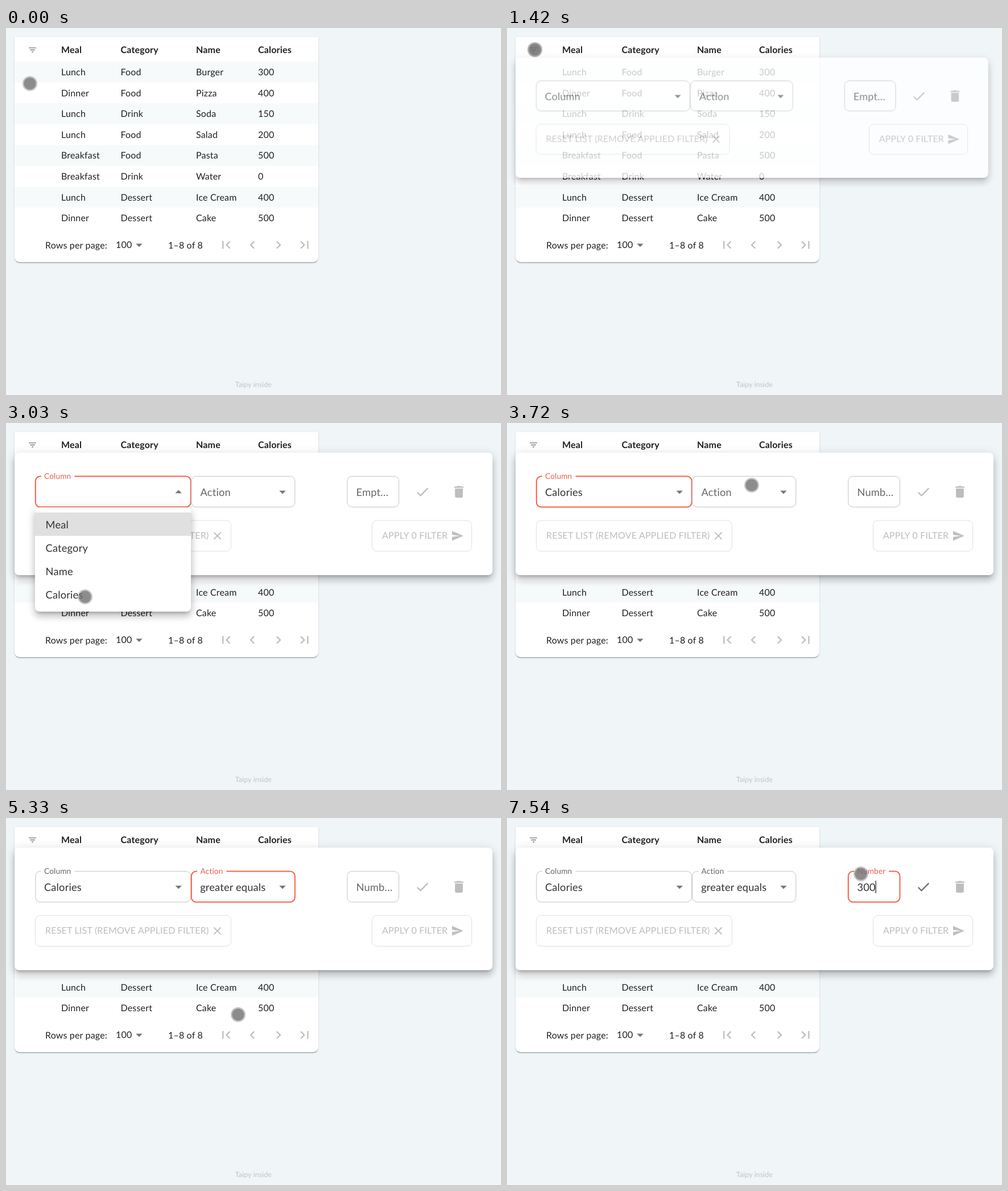
Recreate the animation shown at these times as an HTML page. Size 870x644 px, loop 8000 ms.

```html
<!DOCTYPE html>
<html lang="en">
<head>
<meta charset="utf-8">
<title>Table filter</title>
<style>
  :root { --red: #f9604a; --line: #c4c4c4; --off: #bdbdbd; --ease: cubic-bezier(.4, 0, .2, 1); }
  html, body { margin: 0; width: 100%; height: 100%; overflow: hidden; background: #f0f5f8; }
  .layer, .layer > svg { position: absolute; left: 0; top: 0; width: 870px; height: 644px; overflow: visible; }
  .paper { position: absolute; background: #fff; border-radius: 8px;
    box-shadow: 0 5.7px 5.7px -3.4px #0003, 0 9.1px 11.4px 1.1px #00000024, 0 3.4px 16px 2.3px #0000001f; }
  .table-paper { left: 15px; top: 16px; width: 534px; height: 395px; border-radius: 2px 2px 9px 9px;
    box-shadow: 0 2.3px 1.1px -1.1px #0003, 0 1.1px 1.1px #00000024, 0 1.1px 3.4px #0000001f; }
  .filter-paper { left: 15px; top: 52px; width: 840px; height: 215px; }
  .column-paper { left: 51px; top: 148px; width: 274px; height: 183px; }
  .action-paper { left: 325px; top: 148px; width: 183px; height: 265px; }

  text { font: 16px Lato, sans-serif; letter-spacing: .17px; fill: #212121; stroke: none; text-rendering: geometricPrecision; }
  .head { font-weight: 700; }
  .foot { font-size: 12.7px; letter-spacing: 0; fill: #c0c5c8; }
  .big text { font-size: 18.27px; fill: #333; }
  .button rect { fill: none; stroke: #e0e0e0; }
  .button text { fill: var(--off); letter-spacing: .2px; }
  .icon { fill: #757575; }
  .off { fill: var(--off); }

  .field { stroke: var(--line); stroke-width: 1; color: #666; }
  .field rect { fill: none; }
  .field .notch { fill: #fff; stroke: none; }
  .field .label { fill: currentColor; }
  .field .arrow { fill: #757575; stroke: none; }

  /* One loop is 8000 ms, so 1% is 80 ms. */
  .layer, .grow, .label { animation: 8s var(--ease) infinite; }
  .field, .step, .arrow { animation: 8s step-end infinite; }

  .grow { position: absolute; inset: 0; width: 870px; height: 644px; }
  #filter { animation-name: filter-fade; }
  #filter .grow { animation-name: filter-grow; transform-origin: 15px 52px; }
  #columns { animation-name: columns-fade; }
  #columns .grow { animation-name: columns-grow; transform-origin: 188px 148px; }
  #actions { animation-name: actions-fade; }
  #actions .grow { animation-name: actions-grow; transform-origin: 416.5px 148px; }
  @keyframes filter-fade { 0%, 16.06% { opacity: 0 } 19.53%, 100% { opacity: 1 } }
  @keyframes filter-grow { 0%, 16.06% { transform: scale(.75, .5625) } 18.36%, 100% { transform: scale(1, 1) } }
  @keyframes columns-fade { 0%, 26.59% { opacity: 0 } 29.93%, 38.63% { opacity: 1 } 41.97%, 100% { opacity: 0 } }
  @keyframes columns-grow {
    0%, 26.59% { transform: scale(.75, .5625) } 28.81%, 39.7% { transform: scale(1, 1) }
    41.97%, 100% { transform: scale(.75, .5625) }
  }
  @keyframes actions-fade { 0%, 46.96% { opacity: 0 } 50.6%, 62% { opacity: 1 } 65.65%, 100% { opacity: 0 } }
  @keyframes actions-grow {
    0%, 46.96% { transform: scale(.75, .5625) } 49.4%, 63.2% { transform: scale(1, 1) }
    65.65%, 100% { transform: scale(.75, .5625) }
  }

  #column { animation-name: column-focus; }
  #action { animation-name: action-focus; }
  #number { animation-name: number-focus; }
  @keyframes column-focus { 26.38% { stroke: var(--red); stroke-width: 2; color: #e4614c } 46.63%, 100% { stroke: var(--line); stroke-width: 1; color: #666 } }
  @keyframes action-focus { 46.63% { stroke: var(--red); stroke-width: 2; color: #e4614c } 76.63%, 100% { stroke: var(--line); stroke-width: 1; color: #666 } }
  @keyframes number-focus { 76.63%, 100% { stroke: var(--red); stroke-width: 2; color: #e4614c } }

  .label { animation-timing-function: cubic-bezier(0, 0, .2, 1); transform-origin: 0 0; }
  #column .label { animation-name: column-label; }
  #action .label { animation-name: action-label; }
  #number .label { animation-name: number-label; }
  @keyframes column-label { 0%, 26.88% { transform: none } 29.38%, 100% { transform: translateY(-30px) scale(.75) } }
  @keyframes action-label { 0%, 47.25% { transform: none } 49.75%, 100% { transform: translateY(-30px) scale(.75) } }
  @keyframes number-label { 0%, 76.88% { transform: none } 79.38%, 100% { transform: translateY(-30px) scale(.75) } }

  #column .arrow { animation-name: column-arrow; }
  #action .arrow { animation-name: action-arrow; }
  @keyframes column-arrow { 0% { transform: none } 26.38% { transform: rotate(180deg) } 38.63%, 100% { transform: none } }
  @keyframes action-arrow { 0% { transform: none } 46.63% { transform: rotate(180deg) } 62%, 100% { transform: none } }

  #column .notch { animation-name: at-column; }
  #action .notch { animation-name: at-action; }
  #number .notch, .number-name { animation-name: at-number; }
  .column-value { animation-name: at-picked; }
  .action-value { animation-name: at-chosen; }
  .empty-hint { animation-name: until-picked; }
  .number-hint { animation-name: picked-to-number; }
  .digit1 { animation-name: at-digit1; }
  .digit2 { animation-name: at-digit2; }
  .digit3 { animation-name: at-digit3; }
  @keyframes at-column { 0% { visibility: hidden } 26.9%, 100% { visibility: visible } }
  @keyframes at-picked { 0% { visibility: hidden } 38.63%, 100% { visibility: visible } }
  @keyframes until-picked { 0% { visibility: visible } 38.63%, 100% { visibility: hidden } }
  @keyframes picked-to-number { 0% { visibility: hidden } 38.63% { visibility: visible } 76.63%, 100% { visibility: hidden } }
  @keyframes at-action { 0% { visibility: hidden } 47.3%, 100% { visibility: visible } }
  @keyframes at-chosen { 0% { visibility: hidden } 62%, 100% { visibility: visible } }
  @keyframes at-number { 0% { visibility: hidden } 76.63%, 100% { visibility: visible } }
  @keyframes at-digit1 { 0% { visibility: hidden } 89.25%, 100% { visibility: visible } }
  @keyframes at-digit2 { 0% { visibility: hidden } 91.75%, 100% { visibility: visible } }
  @keyframes at-digit3 { 0% { visibility: hidden } 94.25%, 100% { visibility: visible } }

  .field .caret { fill: #111; stroke: none; animation-name: caret; }
  @keyframes caret {
    0% { opacity: 0; transform: none } 79.4% { opacity: 1; transform: none } 86% { opacity: 0; transform: none }
    89.25% { opacity: 1; transform: translateX(10.5px) } 91.75% { opacity: 1; transform: translateX(21px) }
    94.25%, 100% { opacity: 1; transform: translateX(31.5px) }
  }
  .check { animation-name: check; }
  @keyframes check { 0% { fill: #bdbdbd } 89.25%, 100% { fill: #6e6e6e } }
  .press { animation-name: press; }
  @keyframes press { 0% { opacity: 0 } 16% { opacity: .16 } 20%, 100% { opacity: 0 } }

  #pointer { animation: pointer 8s ease-in-out infinite; }
  @keyframes pointer {
    0%, 4.4% { transform: translate(42px, 97.5px) }
    14.25%, 18% { transform: translate(49px, 38px) }
    25.25%, 28.3% { transform: translate(132px, 113px) }
    35.4%, 39.4% { transform: translate(139px, 305px) }
    45.6%, 55.7% { transform: translate(430px, 109px) }
    55.75% { transform: translate(417px, 244px); animation-timing-function: ease-out }
    57.4%, 69.2% { transform: translate(408px, 345px) }
    72.6%, 75.8% { transform: translate(623px, 114px) }
    75.87%, 76.9% { transform: translate(628px, 111px) }
    81.2%, 100% { transform: translate(622px, 98px) }
  }
</style>
</head>
<body>
<svg width="0" height="0" style="position:absolute">
  <symbol id="filter-icon" viewBox="0 0 24 24"><path d="M10 18h4v-2h-4zM3 6v2h18V6zm3 7h12v-2H6z"/></symbol>
  <symbol id="down" viewBox="0 0 24 24"><path d="M7 10l5 5 5-5z"/></symbol>
  <symbol id="first" viewBox="0 0 24 24"><path d="M18.4 16.6L13.8 12l4.6-4.6L17 6l-6 6 6 6zM6 6h2v12H6z"/></symbol>
  <symbol id="prev" viewBox="0 0 24 24"><path d="M15.4 16.6L10.8 12l4.6-4.6L14 6l-6 6 6 6z"/></symbol>
  <symbol id="next" viewBox="0 0 24 24"><path d="M8.6 16.6L13.2 12 8.6 7.4 10 6l6 6-6 6z"/></symbol>
  <symbol id="last" viewBox="0 0 24 24"><path d="M5.6 7.4L10.2 12l-4.6 4.6L7 18l6-6-6-6zM16 6h2v12h-2z"/></symbol>
  <symbol id="tick" viewBox="0 0 24 24"><path d="M9 16.2L4.8 12l-1.4 1.4L9 19 21 7l-1.4-1.4z"/></symbol>
  <symbol id="bin" viewBox="0 0 24 24"><path d="M6 19c0 1.1.9 2 2 2h8c1.1 0 2-.9 2-2V7H6zM19 4h-3.5l-1-1h-5l-1 1H5v2h14z"/></symbol>
  <symbol id="cross" viewBox="0 0 24 24"><path d="M19 6.4L17.6 5 12 10.6 6.4 5 5 6.4l5.6 5.6L5 17.6 6.4 19l5.6-5.6 5.6 5.6 1.4-1.4-5.6-5.6z"/></symbol>
  <symbol id="send" viewBox="0 0 24 24"><path d="M2 21l21-9L2 3v7l15 2-15 2z"/></symbol>
</svg>

<div class="layer">
  <div class="paper table-paper"></div>
  <svg>
    <g id="rows"></g>
    <use class="icon" href="#filter-icon" x="37.9" y="29.8" width="17.3" height="17.3"/>
    <text x="69" y="387">Rows per page:</text>
    <text x="193" y="386">100</text>
    <text x="285" y="387">1–8 of 8</text>
    <use class="icon" href="#down" x="220.3" y="367" width="27.4" height="27.4"/>
    <g class="off">
      <use href="#first" x="373.3" y="367" width="27.4" height="27.4"/>
      <use href="#prev" x="419.3" y="367" width="27.4" height="27.4"/>
      <use href="#next" x="465.3" y="367" width="27.4" height="27.4"/>
      <use href="#last" x="511" y="367" width="27.4" height="27.4"/>
    </g>
    <text class="foot" x="402.7" y="629.5">Taipy inside</text>
  </svg>
</div>

<div class="layer" id="filter"><div class="grow">
  <div class="paper filter-paper"></div>
  <svg class="layer">
    <g class="big">
      <g class="field" id="column">
        <rect x="51.8" y="93.5" width="273" height="54" rx="8.5"/>
        <rect class="notch step" x="62" y="91" width="58.5" height="5"/>
        <g transform="translate(303.3 121)"><path class="arrow" d="M-5.7-2.3H5.7L0 3.4z"/></g>
        <g transform="translate(67 128)"><text class="label">Column</text></g>
        <text class="step column-value" x="67" y="128">Calories</text>
      </g>
      <g class="field" id="action">
        <rect x="325.8" y="93.5" width="182" height="54" rx="8.5"/>
        <rect class="notch step" x="336" y="91" width="51.5" height="5"/>
        <g transform="translate(486 121)"><path class="arrow" d="M-5.7-2.3H5.7L0 3.4z"/></g>
        <g transform="translate(341.5 128)"><text class="label">Action</text></g>
        <text class="step action-value" x="341.2" y="128">greater equals</text>
      </g>
      <g class="field" id="number">
        <rect x="599.8" y="93.5" width="90.7" height="54" rx="8.5"/>
        <rect class="notch step" x="610" y="91" width="61" height="5"/>
        <text class="step empty-hint" x="615.5" y="128" style="fill:#666">Empt…</text>
        <text class="step number-hint" x="615.5" y="128" style="fill:#666">Numb…</text>
        <g class="step number-name" transform="translate(615.5 128)"><text class="label">Number</text></g>
        <text x="615.5" y="128"><tspan class="step digit1">3</tspan><tspan class="step digit2">0</tspan><tspan class="step digit3">0</tspan></text>
        <rect class="caret step" x="616" y="110" width="1.2" height="22"/>
      </g>
    </g>
    <use class="step check" href="#tick" x="718.2" y="107.2" width="27.4" height="27.4"/>
    <use class="off" href="#bin" x="782.3" y="107" width="27.4" height="27.4"/>
    <g class="button">
      <rect x="51.5" y="171" width="344" height="54" rx="8.5"/>
      <text x="69" y="203">RESET LIST (REMOVE APPLIED FILTER)</text>
      <use class="off" href="#cross" x="360.1" y="186.6" width="22.8" height="22.8"/>
      <rect x="643.5" y="171" width="175" height="54" rx="8.5"/>
      <text x="661" y="203">APPLY 0 FILTER</text>
      <use class="off" href="#send" x="782.1" y="186.6" width="22.8" height="22.8"/>
    </g>
  </svg>
</div></div>

<div class="layer" id="columns"><div class="grow">
  <div class="paper column-paper"></div>
  <svg class="layer"><rect x="51" y="157" width="274" height="41.1" fill="#e0e0e0"/><g class="big" id="column-items"></g></svg>
</div></div>

<div class="layer" id="actions"><div class="grow">
  <div class="paper action-paper"></div>
  <svg class="layer"><g class="big" id="action-items"></g></svg>
</div></div>

<div class="layer">
  <svg>
    <circle class="step press" cx="49" cy="38" r="13"/>
    <g id="pointer">
      <circle r="13" fill="#8c8c8c" fill-opacity=".5"/>
      <circle r="10.6" fill="#666" fill-opacity=".6"/>
    </g>
  </svg>
</div>

<script>
  const meals = [
    "Lunch,Food,Burger,300", "Dinner,Food,Pizza,400", "Lunch,Drink,Soda,150", "Lunch,Food,Salad,200",
    "Breakfast,Food,Pasta,500", "Breakfast,Drink,Water,0", "Lunch,Dessert,Ice Cream,400", "Dinner,Dessert,Cake,500"
  ];
  const columnX = [97, 201.5, 334, 443];
  const rowHeight = 36.57, itemHeight = 41.1;

  const text = (x, y, label, cls = "") => `<text class="${cls}" x="${x}" y="${y}">${label}</text>`;
  const cells = (labels, y, cls) => labels.map((label, i) => text(columnX[i], y, label, cls)).join("");
  const fill = (id, markup) => { document.getElementById(id).innerHTML = markup; };
  const items = (labels, x) => labels.map((label, i) => text(x, 184.8 + i * itemHeight, label)).join("");

  const stripe = i => i % 2 ? "" :
    `<rect x="15" y="${59.2 + i * rowHeight}" width="534" height="${rowHeight}" fill="#f6fafb"/>`;
  fill("rows", cells(["Meal", "Category", "Name", "Calories"], 43.5, "head") +
    meals.map((meal, i) => stripe(i) + cells(meal.split(","), Math.round(83.2 + i * rowHeight))).join(""));
  fill("column-items", items(["Meal", "Category", "Name", "Calories"], 69.6));
  fill("action-items", items(["less", "less equals", "equals", "not equals", "greater equals", "greater"], 343.6));
</script>
</body>
</html>
```
